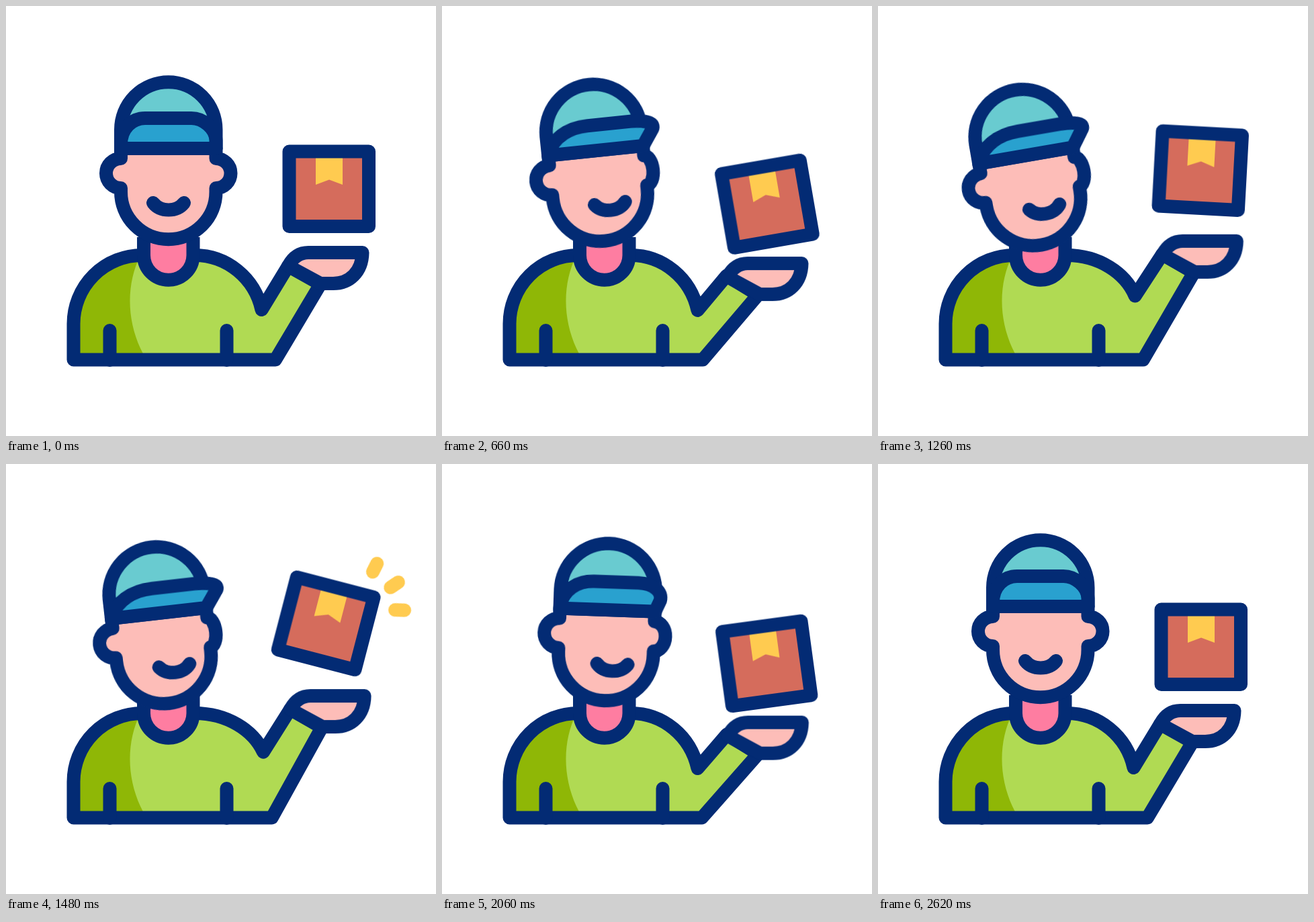
Recreate the animation shown at these times as an HTML page without scripts. Size 640 by 640 pixels, loop 3 s.

```html
<!DOCTYPE html>
<html lang="en">
<head>
<meta charset="utf-8">
<title>Courier tossing a parcel</title>
<style>
  :root {
    --ink: #032b74;
    --swing: cubic-bezier(.37, 0, .63, 1);
    --settle: cubic-bezier(.3, 0, .3, 1);
  }
  html, body { margin: 0; width: 100%; height: 100%; overflow: hidden; background: #fff; }
  svg { display: block; width: 100vw; height: 100vh; }

  .line { stroke: var(--ink); stroke-width: 20; stroke-linecap: round; stroke-linejoin: round; }
  .open { fill: none; }
  .skin { fill: #fdbdb8; }
  .neck { fill: #fe7da1; stroke-linecap: butt; }
  .move { animation: 3s var(--swing) infinite; }

  .nod { animation-name: nod; }
  .tilt { animation-name: tilt; transform-origin: 241px 340px; }
  .face { animation-name: face; }
  .brim { animation-name: brim; fill: #29a1cf; }
  .mouth { animation-name: mouth; }
  .torso { animation-name: torso; }
  .hand { animation-name: hand; }
  .toss { animation-name: toss; }
  .spin { animation-name: spin; transform-origin: 480.5px 254px; }
  .sparks {
    animation: spark 3s linear infinite;
    stroke: #ffcb50; stroke-linecap: round; fill: none;
  }

  /* Head */
  @keyframes nod {
    0%, 7.33%, 87.33%, 100% { transform: translateY(0); }
    48%, 52% { transform: translateY(9.2px); }
    52% { animation-timing-function: var(--settle); }
  }
  @keyframes tilt {
    0%, 7.33%, 87.33%, 100% { transform: rotate(0deg); }
    33.33%, 45% { transform: rotate(-9.8deg); }
    58.83% { transform: rotate(5deg); animation-timing-function: var(--settle); }
  }
  @keyframes mouth {
    0%, 7.33%, 87.33%, 100% { transform: translate(0, 0); }
    25.33%, 58% { transform: translate(14px, -1px); }
    58% { animation-timing-function: var(--settle); }
  }
  @keyframes face {
    0%, 7.33%, 78%, 100% {
      d: path("M171 212V227A22 22 0 0 0 171 271V276.5A70.75 70.75 0 0 0 312.5 276.5V271A22 22 0 0 0 312.5 227V212Z");
    }
    25.33%, 58% {
      d: path("M171 212V227A22 22 0 0 0 171 271V276.5A70.75 70.75 0 0 0 312.5 276.5V271A10.5 22 0 0 0 312.5 227V212Z");
    }
    58% { animation-timing-function: var(--settle); }
  }
  @keyframes brim {
    0%, 7.33%, 78%, 100% {
      d: path("M171 206C171 182 188 167 207 167L276 167C293 167 312 182 312.5 200L312.5 212L171 212Z");
    }
    25.33%, 58% {
      d: path("M171 209C182 190 202 174.5 236 174.5L300 174.5C330 175.5 337 182 329 190L313 212L171 212Z");
    }
    58% { animation-timing-function: var(--settle); }
  }

  /* Arm: rest, low, high, low, rest */
  @keyframes torso {
    0%, 7.33%, 87.33%, 100% {
      d: path("M100.5 526.5V473A102 102 0 0 1 202.5 371L281 371C329 371 370 405 380.5 452L420 387L468 414L401 526.5Z");
    }
    26%, 66.67% {
      d: path("M100.5 526.5V473A102 102 0 0 1 202.5 371L281 371C329 371 370 405 380.5 453L424 403L470.5 432L386.5 526.5Z");
    }
    47.33% {
      d: path("M100.5 526.5V473A102 102 0 0 1 202.5 371L281 371C329 371 368 396 383 428L423 364L470 391L396 526.5Z");
    }
  }
  @keyframes hand {
    0%, 7.33%, 87.33%, 100% { transform: translate(0, 0); }
    26%, 66.67% { transform: translate(5.5px, 18px); }
    47.33% { transform: translate(3px, -23px); }
  }

  /* Parcel */
  @keyframes toss {
    0%, 7.33%, 87.33%, 100% { transform: translateY(0); }
    26%, 66.67% { transform: translateY(25.5px); }
    47.33% { transform: translateY(-36px); }
  }
  @keyframes spin {
    0%, 7.33%, 87.33%, 100% { transform: rotate(0deg); }
    29.33% { transform: rotate(-13deg); }
    53.33% { transform: rotate(16.5deg); }
    71.33% { transform: rotate(-9deg); }
  }
  @keyframes spark {
    0%, 43.5% { stroke-width: 0; stroke-dasharray: 0 99; stroke-dashoffset: 0; }
    45% { stroke-width: 20; }
    49.33% { stroke-dasharray: 14 99; stroke-dashoffset: -13; }
    57.33% { stroke-dasharray: 16 99; stroke-dashoffset: -30.5; }
    61% { stroke-dasharray: 10 99; stroke-dashoffset: -42; }
    64% { stroke-width: 20; }
    65%, 100% { stroke-width: 0; stroke-dasharray: 0 99; stroke-dashoffset: -52; }
  }
</style>
</head>
<body>
<svg viewBox="0 0 640 640">
  <path class="move torso" fill="#b0da53"/>
  <path fill="#8fb706" d="M100.5 526.5V473A102 102 0 0 1 200 371C178 415 178 475 209 526.5Z"/>
  <path class="move torso line open"/>
  <path class="line open" d="M154.5 483V527M328.5 483V527"/>
  <path class="line neck" d="M205 344V371A36.75 36.75 0 0 0 278.5 371V344"/>

  <path class="move hand line skin"
        d="M420 387C427 374 437 367 450 367H530.5C530 396 511 413 487 413H468Z"/>

  <g class="move toss">
    <g class="move spin">
      <g class="sparks">
        <path d="M526.2 193.2L537.1 142.3"/>
        <path d="M551.7 206L586 167"/>
        <path d="M562.5 229.7L613.2 218.3"/>
      </g>
      <path fill="#d56c5c" d="M421.5 216.5H540V328H421.5Z"/>
      <path fill="#ffcb50" d="M461 217V266L481 258.5L501 266V217Z"/>
      <path class="line open" d="M421.5 216.5H540V328H421.5Z"/>
    </g>
  </g>

  <g class="move nod">
    <g class="move tilt">
      <path class="move face line skin"/>
      <path class="move mouth line open" d="M219 293C230 307 254 307 265 293"/>
      <path class="line" fill="#69cbd0" d="M171 212V184A70.75 70.75 0 0 1 312.5 184V212Z"/>
      <path class="move brim line"/>
    </g>
  </g>
</svg>
</body>
</html>
```
